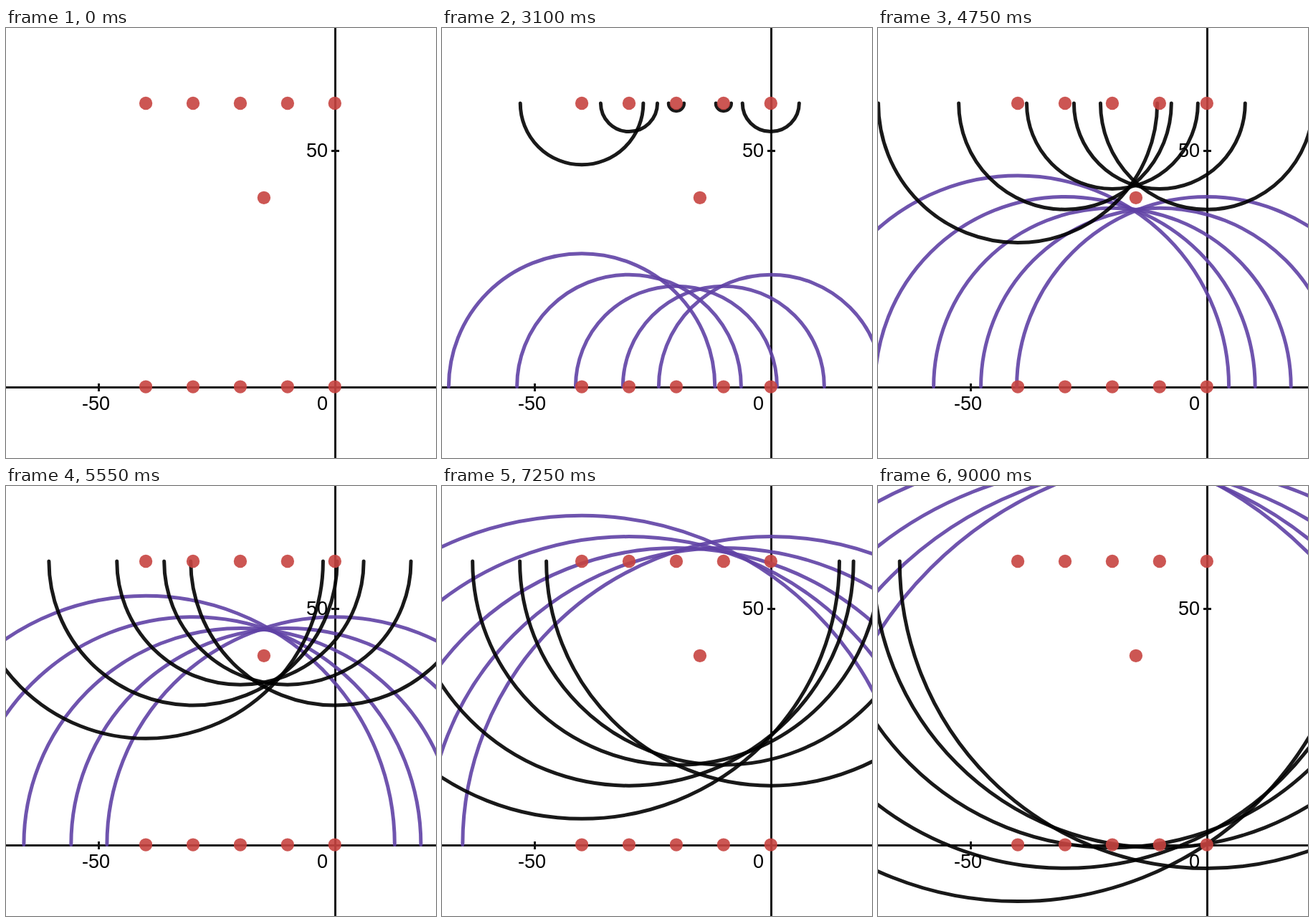
An HTML page that plays this animation: 600 by 600 pixels, repeating every 9050 ms.

```html
<!DOCTYPE html>
<html lang="en">
<head>
<meta charset="utf-8">
<title>Growing semicircles</title>
<style>
  html, body { margin: 0; width: 100%; height: 100%; overflow: hidden; background: #fff; }
  svg { display: block; width: 600px; height: 600px; }
  .axes { stroke: #111; stroke-width: 3; fill: none; }
  text { font: 27px "Liberation Sans", Arial, sans-serif; fill: #000; }
  .arcs path { fill: none; stroke-width: 5; stroke-linecap: round; opacity: .9; }
  .dots circle { fill: #c74440; opacity: .9; }
</style>
</head>
<body>
<svg viewBox="0 0 600 600">
  <path class="axes" d="M0 501.5H600M459.5 0V600M129.5 496V507M454 171.5H465"/>
  <text x="106" y="533">-50</text>
  <text x="434" y="533">0</text>
  <text x="419" y="180">50</text>
  <g class="arcs"></g>
  <g class="dots"></g>
</svg>
<script>
const LOOP = 9050, STEP = 50, START = 350;
const UNIT = 600 / 91, OX = 458.8, OY = 500.6;
const focus = { x: -15, y: 40 };
const columns = [-40, -30, -20, -10, 0];
const rows = [
  { y: 0, color: '#6042a6', sweep: 1 },
  { y: 60, color: '#000', sweep: 0 }
];

const px = x => OX + x * UNIT;
const py = y => OY - y * UNIT;

function add(parent, tag, attrs) {
  const el = document.createElementNS('http://www.w3.org/2000/svg', tag);
  for (const key in attrs) el.setAttribute(key, attrs[key]);
  return document.querySelector(parent).appendChild(el);
}

const addDot = (x, y) => add('.dots', 'circle', { cx: px(x), cy: py(y), r: 9.2 });

const arcs = rows.flatMap(({ y, color, sweep }) => columns.map(x => {
  addDot(x, y);
  return {
    x: px(x), y: py(y), sweep,
    dist: Math.hypot(x - focus.x, y - focus.y),
    el: add('.arcs', 'path', { stroke: color })
  };
}));
addDot(focus.x, focus.y);

// Every arc reaches the focus point at 5000 ms.
function draw(ms) {
  const t = Math.floor(ms / STEP) * STEP;
  for (const { x, y, sweep, dist, el } of arcs) {
    const r = (dist + (t - 5000) / 100) * UNIT;
    const d = t >= START && r > 0
      ? `M${x - r} ${y}A${r} ${r} 0 0 ${sweep} ${x + r} ${y}`
      : '';
    el.setAttribute('d', d);
  }
}

const begin = performance.now();
function tick() {
  draw((performance.now() - begin) % LOOP);
  requestAnimationFrame(tick);
}
tick();
</script>
</body>
</html>
```
